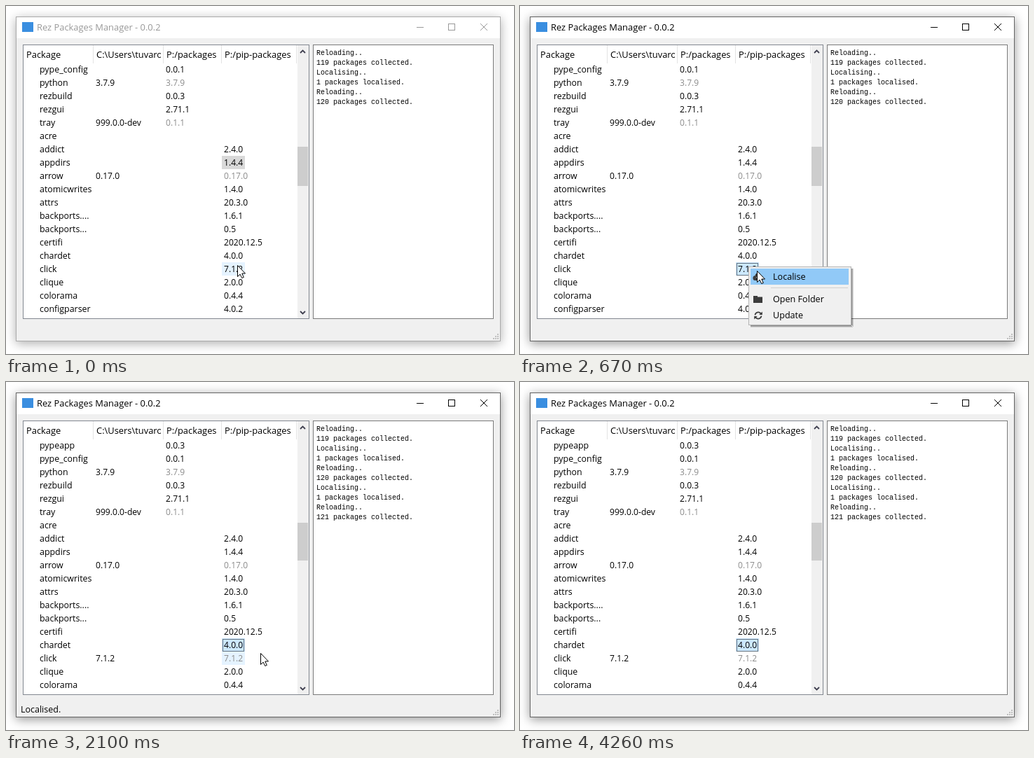
Animation, 725 px wide and 497 px high, one loop 4940 ms. Source, as an HTML page with a canvas:

```html
<!DOCTYPE html>
<html lang="en">
<head>
<meta charset="utf-8">
<title>Rez Packages Manager</title>
<style>
html, body { margin: 0; width: 100%; height: 100%; overflow: hidden; background: #fff; }
canvas { display: block; }
</style>
</head>
<body>
<canvas id="stage" width="725" height="497"></canvas>
<script>
const c = document.getElementById('stage').getContext('2d');
const LOOP = 4940;
const RELOAD = 2100;
const UI = '"Open Sans", "Noto Sans", sans-serif';
const MONO = '"Liberation Mono", monospace';

// name | local | packages | pip-packages
const ROWS = `pypeapp||0.0.3
pype_config||0.0.1
python|3.7.9|3.7.9
rezbuild||0.0.3
rezgui||2.71.1
tray|999.0.0-dev|0.1.1
acre
addict|||2.4.0
appdirs|||1.4.4
arrow|0.17.0||0.17.0
atomicwrites|||1.4.0
attrs|||20.3.0
backports....|||1.6.1
backports...|||0.5
certifi|||2020.12.5
chardet|||4.0.0
click|||7.1.2
clique|||2.0.0
colorama|||0.4.4
configparser|||4.0.2`.split('\n').map(r => r.split('|'));

const LOG = [119, 120, 121].flatMap(n => ['Reloading..', `${n} packages collected.`,
  'Localising..', '1 packages localised.']);

// Mouse stops; ease is the power used on the way to that stop
const PATH = [
  { t: 0, x: 330, y: 370 },
  { t: 380, x: 330, y: 370 },
  { t: 430, x: 326, y: 373 },
  { t: 570, x: 326, y: 373 },
  { t: 870, x: 363, y: 387 },
  { t: 3000, x: 363, y: 387 },
  { t: 3790, x: 354, y: 388, ease: 3 },
  { t: 4060, x: 354, y: 388 },
  { t: 4260, x: 864, y: 531, ease: 2 },
];

const ramp = (t, from, to) => Math.min(1, Math.max(0, (t - from) / (to - from)));
const grey = v => `rgb(${v},${v},${v})`;

function cursorAt(t) {
  let { x, y } = PATH[0];
  for (let i = 1; i < PATH.length; i++) {
    const a = PATH[i - 1], b = PATH[i];
    const u = ramp(t, a.t, b.t) ** (b.ease || 1);
    x += (b.x - a.x) * u;
    y += (b.y - a.y) * u;
  }
  return [Math.round(x), Math.round(y)];
}

function rect(x, y, w, h, color) {
  c.fillStyle = color;
  c.fillRect(x, y, w, h);
}

function frame(x, y, w, h, color) {
  c.strokeStyle = color;
  c.lineWidth = 1;
  c.strokeRect(x + .5, y + .5, w - 1, h - 1);
}

function text(s, x, y, size = 12.6, color = '#000', family = UI) {
  c.font = `${size}px ${family}`;
  c.fillStyle = color;
  c.fillText(s, x, y);
}

function line(points, color, width = 1) {
  c.beginPath();
  points.forEach(p => c.lineTo(...p));
  c.strokeStyle = color;
  c.lineWidth = width;
  c.stroke();
}

function drawWindow(active) {
  c.save();
  c.shadowColor = `rgba(0,0,0,${.32 + .1 * active})`;
  c.shadowBlur = 14;
  c.shadowOffsetY = 3;
  rect(14, 15, 692, 464, '#f0f0f0');
  c.restore();
  rect(15, 16, 690, 30, '#fff');
  frame(14, 15, 692, 464, grey(170 - 70 * active));
  rect(23, 23, 16, 14, '#3a8ee0');

  const ink = grey(Math.round(153 * (1 - active)));
  text('Rez Packages Manager - 0.0.2', 44, 35, 12.9, ink);
  line([[586, 30.5], [596, 30.5]], ink);
  frame(631, 25, 10, 10, ink);
  line([[677, 25], [687, 35]], ink);
  line([[687, 25], [677, 35]], ink);

  for (let i = 0; i < 3; i++)
    for (let j = 0; j <= i; j++) rect(701 - 3 * j, 468 + 3 * i, 2, 2, '#bfbfbf');
}

function drawCell(row, color, focus) {
  const y = 81 + 19 * row;
  rect(308, y, 33, 19, color);
  if (!focus) return;
  c.setLineDash([1, 1]);
  frame(309, y + 1, 31, 18, '#000');
  c.setLineDash([]);
}

function drawHeader() {
  [124, 224, 307, 414].forEach(x => rect(x, 56, 1, 26, '#e3e3e3'));
  text('Package', 29, 74, 12.9);
  c.save();
  c.beginPath();
  c.rect(125, 56, 96, 26);
  c.clip();
  text('C:\\Users\\tuvaroj', 129, 74, 12.9);
  c.restore();
  text('P:/packages', 229, 74, 12.9);
  text('P:/pip-packages', 312, 74, 12.9);
}

function drawTable(t, done) {
  rect(24, 55, 409, 392, '#fff');
  drawHeader();

  if (t < 50) {
    drawCell(7, '#d9d9d9');
    drawCell(15, '#e5f3ff');
  } else {
    drawCell(15, '#cce8ff', true);
    if (done && t < 4060) drawCell(16, '#e5f3ff');
  }

  const first = done ? 0 : 1;
  ROWS.slice(first, first + 19).forEach(([name, local, pkg, pip], i) => {
    const y = 95 + 19 * i;
    if (done && name === 'click') local = pip;
    const ink = local ? '#8c8c8c' : '#000';
    text(name, 48, y, 12.4);
    if (local) text(local, 128, y, 12.1);
    if (pkg) text(pkg, 228, y, 12.1, ink);
    if (pip) text(pip, 311, y, 12.1, ink);
  });

  rect(416, 56, 16, 390, '#f0f0f0');
  rect(416, 201, 15, done ? 54 : 56, '#cdcdcd');
  line([[420, 67], [423.5, 63.5], [427, 67]], '#404050', 1.8);
  line([[420, 436], [423.5, 439.5], [427, 436]], '#404050', 1.8);
  frame(24, 55, 409, 392, '#828790');
}

function drawLog(done) {
  rect(438, 55, 258, 392, '#fff');
  frame(438, 55, 258, 392, '#7a7a7a');
  LOG.slice(0, done ? 10 : 6).forEach((s, i) => text(s, 443, 70 + 14 * i, 10, '#000', MONO));
}

function drawIcons() {
  const ink = '#3c3c3c';
  // cloud with arrow
  c.fillStyle = ink;
  c.beginPath();
  for (const side of [-1, 0, 1]) {
    const x = 339.7 + 3.8 * side, y = side ? 388.5 : 385.5, r = side ? 3.5 : 4.2;
    c.moveTo(x + r, y);
    c.arc(x, y, r, 0, 7);
  }
  c.fill();
  rect(336, 388, 8, 4, ink);
  line([[340, 384], [340, 389]], '#f0f0f0', 1.6);
  line([[337.5, 387], [340, 389.7], [342.5, 387]], '#f0f0f0', 1.4);

  // folder
  rect(333, 414, 6, 3, ink);
  rect(333, 415.5, 13, 8.5, ink);

  // refresh arrows
  for (const turn of [0, Math.PI]) {
    c.save();
    c.translate(340, 442);
    c.rotate(turn);
    c.beginPath();
    c.arc(0, 0, 4.6, Math.PI * 1.05, Math.PI * 1.8);
    c.strokeStyle = ink;
    c.lineWidth = 1.8;
    c.stroke();
    c.beginPath();
    c.moveTo(5.8, -5.6);
    c.lineTo(5.8, -1);
    c.lineTo(1.2, -1);
    c.fill();
    c.restore();
  }
}

function drawMenu(alpha, hot) {
  if (!alpha) return;
  c.save();
  c.globalAlpha = alpha;
  for (let i = 0; i < 3; i++) {
    const shade = `rgba(0,0,0,${.42 - .13 * i})`;
    rect(473 + i, 375, 1, 81 + i, shade);
    rect(329, 456 + i, 144 + i, 1, shade);
  }
  rect(326, 372, 147, 84, '#f0f0f0');
  frame(326, 372, 147, 84, '#b4b4b4');
  if (hot) rect(329, 375, 140, 23, '#91c9f7');
  rect(358, 402, 110, 1, '#d0d0d0');
  drawIcons();
  text('Localise', 361, 391);
  text('Open Folder', 361, 423);
  text('Update', 361, 446);
  c.restore();
}

function drawCursor(x, y) {
  c.save();
  c.translate(x + .5, y + .5);
  c.beginPath();
  [[0, 0], [0, 16], [3.6, 12.6], [6.2, 18], [8.8, 17], [6.3, 11.5], [11, 11.5]]
    .forEach(p => c.lineTo(...p));
  c.closePath();
  c.fillStyle = '#fff';
  c.fill();
  c.strokeStyle = '#000';
  c.lineWidth = 1;
  c.stroke();
  c.restore();
}

function draw(now) {
  const t = now % LOOP;
  const done = t >= RELOAD;
  const [x, y] = cursorAt(t);
  rect(0, 0, 725, 497, '#fff');
  drawWindow(ramp(t - t % 50, 0, 200));
  drawTable(t, done);
  drawLog(done);
  if (done && t < 3500) text('Localised.', 21, 472, 12.5);
  drawMenu(ramp(t, 375, 570) * (1 - ramp(t, 940, 1060)), y > 375);
  drawCursor(x, y);
}

const start = performance.now();
function tick() {
  draw(performance.now() - start);
  requestAnimationFrame(tick);
}
tick();
</script>
</body>
</html>
```
